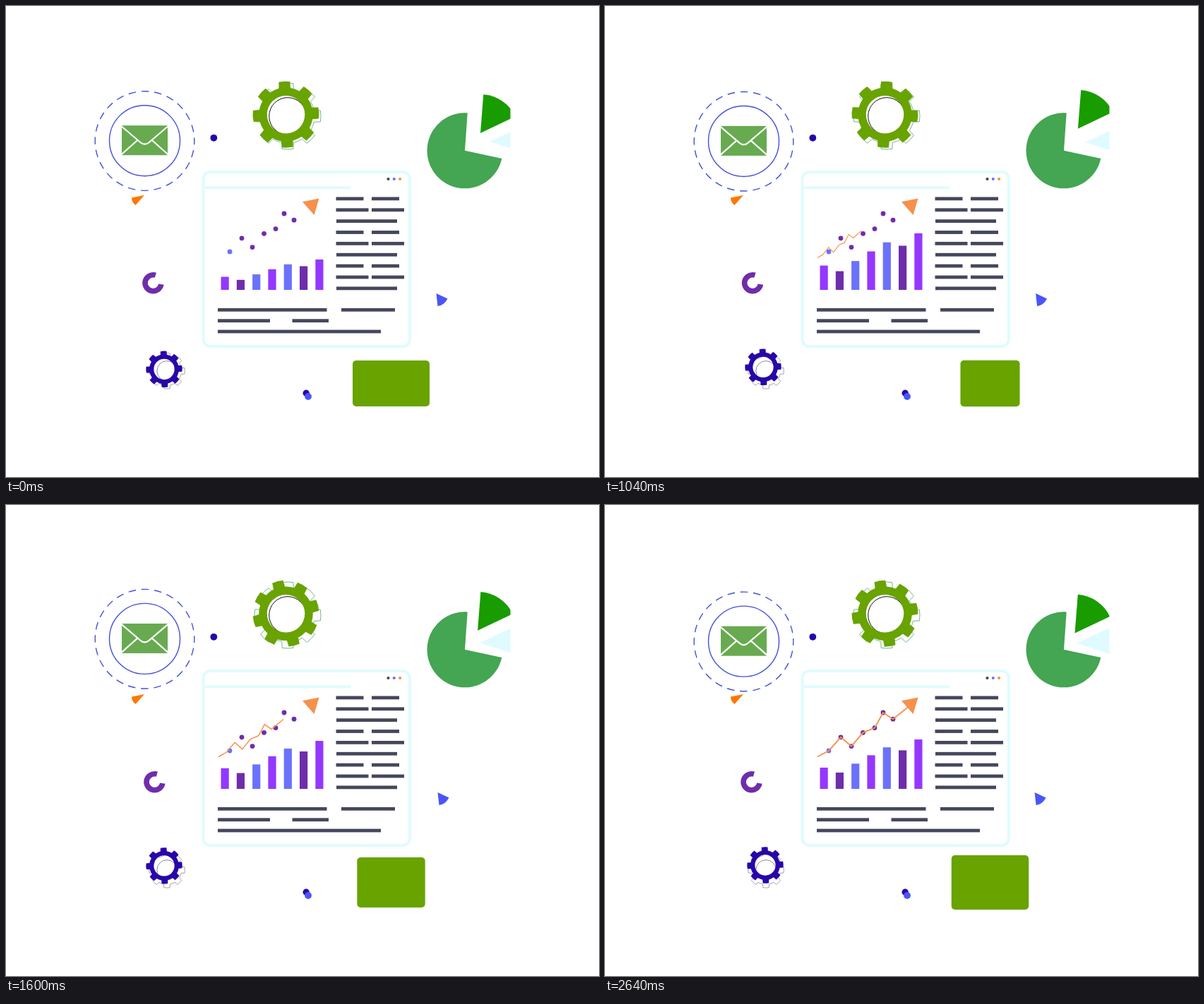
Recreate the animation shown at these times as an HTML page with a canvas. Size 840 by 667 pixels, loop 2720 ms.

```html
<!DOCTYPE html>
<html lang="en">
<head>
<meta charset="utf-8">
<title>Dashboard</title>
<style>
html, body { margin: 0; height: 100%; overflow: hidden; background: #fff; }
canvas { display: block; }
</style>
</head>
<body>
<canvas id="stage" width="840" height="667"></canvas>
<script>
const ctx = document.getElementById('stage').getContext('2d');
const LOOP = 2720, STEP = 80, TAU = Math.PI * 2, DEG = Math.PI / 180;
const INK = '#45475c', ICE = '#e0fbff', NAVY = '#2806a8', BLUE = '#4a55f8',
  SOFT = '#6b72fa', PURPLE = '#6f2dab', VIOLET = '#9438ff', ORANGE = '#f5914a',
  GREEN = '#68a300', LINE = '#4250d8';

// Straight move from a to b between two times, held outside them
const move = (t, t0, t1, a, b) => a + (b - a) * Math.max(0, Math.min(1, (t - t0) / (t1 - t0)));
// Move from a to b until the turning time, then on to c
const turn = (t, mid, end, a, b, c) => t < mid ? move(t, 0, mid, a, b) : move(t, mid, end, b, c);

function fill(color, rule) { ctx.fillStyle = color; ctx.fill(rule || 'nonzero'); }
function stroke(color, width) { ctx.strokeStyle = color; ctx.lineWidth = width; ctx.stroke(); }
function box(x, y, w, h, color) { ctx.fillStyle = color; ctx.fillRect(x, y, w, h); }
function dot(x, y, r, color) { ctx.beginPath(); ctx.arc(x, y, r, 0, TAU); fill(color); }
function circle(x, y, r, color, width) { ctx.beginPath(); ctx.arc(x, y, r, 0, TAU); stroke(color, width); }
function poly(...pts) { ctx.beginPath(); pts.forEach(p => ctx.lineTo(...p)); }
function slice(x, y, r, from, to, color) {
  ctx.beginPath();
  ctx.moveTo(x, y);
  ctx.arc(x, y, r, from * DEG, to * DEG);
  fill(color);
}

function gearPath(x, y, r, angle) {
  ctx.beginPath();
  for (let i = 0; i < 8; i++) {
    const tooth = angle - 90 + i * 45;
    ctx.arc(x, y, r * 0.815, (tooth - 32.5) * DEG, (tooth - 12.5) * DEG);
    ctx.arc(x, y, r, (tooth - 9.7) * DEG, (tooth + 9.7) * DEG);
  }
  ctx.closePath();
}

function gear(x, y, r, angle, color) {
  gearPath(x, y, r, angle);
  ctx.moveTo(x + r * 0.57, y);
  ctx.arc(x, y, r * 0.57, 0, TAU);
  fill(color, 'evenodd');
}

function gearOutline(x, y, r, rim, hole) {
  gearPath(x, y, r, 0);
  stroke(rim, 0.8);
  circle(x, y, r * 0.56, hole, 1);
}

function gears(t) {
  gearOutline(399, 156, 47, '#4fa46c', '#111');
  gear(396.5, 153.7, 47, -2.7 + t * 0.0488, GREEN);
  gearOutline(228, 516.8, 25.3, '#8d8a9c', '#8d8a9c');
  gear(move(t, 1600, 2640, 224, 227), turn(t, 400, 2640, 514.3, 511.8, 510), 25.7, -2, NAVY);
}

function mail(t) {
  ctx.save();
  ctx.translate(196.5, 191.7 + 2.6 * Math.cos((t - 560) / 1800 * TAU));
  circle(0, 0, 50, LINE, 1.4);
  const unit = TAU * 70.3 / 24;
  ctx.setLineDash([unit * 0.58, unit * 0.42]);
  ctx.lineDashOffset = unit * 0.29;
  circle(0, 0.3, 70.3, LINE, 1.4);
  ctx.setLineDash([]);
  box(-32.5, -21.5, 65, 42, '#67aa50');
  ctx.beginPath();
  ctx.moveTo(-33, -20.5);
  ctx.lineTo(-6, 2.5);
  ctx.quadraticCurveTo(0, 7.5, 6, 2.5);
  ctx.lineTo(33, -20.5);
  for (const s of [-1, 1]) { ctx.moveTo(33 * s, 19.5); ctx.lineTo(10.5 * s, -0.5); }
  stroke('#fff', 2.2);
  ctx.restore();
}

function pie(t) {
  slice(650, 204.8, 53.5, 12, 274, '#44a552');
  ctx.save();
  ctx.beginPath();
  ctx.rect(0, 0, 714.5, 667);
  ctx.clip();
  slice(move(t, 400, 2400, 672, 665.5), turn(t, 800, 2100, 180, 172, 181.5), 55, -85.5, -25.5, '#189c00');
  const pull = move(t, 760, 1760, 0, 17);
  slice(685 - pull, 192 + pull * 0.22, 56, -25, 18, ICE);
  ctx.restore();
}

const points = [[317, 348], [334, 328.8], [349, 341.6], [365.5, 322.3], [382, 315.6], [394, 294], [408, 303.2]];
const bars = [[0.43, VIOLET], [0.33, PURPLE], [0.51, SOFT], [0.68, VIOLET], [0.84, SOFT], [0.78, PURPLE], [1, VIOLET]];

function text() {
  const line = (x, y, w) => box(x, y - 2.4, w, 4.8, INK);
  for (let i = 0; i < 9; i++) {
    const y = 272.9 + i * 15.87;
    if (i % 3 === 2) {
      line(468, y, 86);
    } else {
      const w = 39 + i % 3 * 7;
      line(467.5, y, w);
      line(518, y, w);
    }
  }
  line(300, 430.3, 154.5);
  line(475, 430.3, 76);
  line(300, 445.7, 74);
  line(405.5, 445.7, 51.5);
  line(300, 461, 231);
}

function trend(t) {
  if (!t) return;
  const x0 = 301, y0 = 356.5;
  const sx = Math.min(1, t * (0.000488 - 3.1e-8 * t)), sy = 0.1 + 0.9 * sx;
  poly([x0, y0], ...[...points, [432, 284]].map(([x, y]) => [x0 + (x - x0) * sx, y0 + (y - y0) * sy]));
  stroke(ORANGE, 0.4 + 1.5 * sx);
}

function browser(t) {
  ctx.beginPath();
  ctx.roundRect(279.5, 235, 292.5, 247, 10);
  stroke(ICE, 4);
  box(281, 255.3, 207, 4, ICE);
  [INK, SOFT, ORANGE].forEach((c, i) => dot(541.5 + i * 8.3, 245, 2.1, c));
  text();

  const height = t < 2140 ? turn(t, 1120, 2140, 43, 83, 51) : move(t, 2140, 2640, 51, 70);
  bars.forEach(([ratio, color], i) => box(304.5 + i * 22.3, 402, 11.2, -height * ratio, color));

  points.forEach(([x, y], i) => dot(x, y, 3.4, i ? PURPLE : SOFT));
  trend(t);
  poly([420, 277.3], [443.5, 272.5], [436.5, 296]);
  fill(ORANGE);
}

// Triangle with one rounded side between b and c
function wedge(a, b, bend, c, color) {
  ctx.beginPath();
  ctx.moveTo(...a);
  ctx.lineTo(...b);
  ctx.quadraticCurveTo(...bend, ...c);
  fill(color);
}

function smallShapes(t) {
  dot(294.3, 186.8, 4.9, NAVY);
  dot(425.2, 548.3, 4.7, NAVY);
  dot(428, 553, 4.9, BLUE);
  wedge([196, 268], [178, 271.5], [178, 278], [183.5, 282], '#ff7800');

  const sway = t < 1700 ? move(t, 800, 1600, 0, 2) : move(t, 1700, 2640, 2, -0.9);
  ctx.save();
  ctx.translate(sway, 0);
  wedge([609.5, 407], [625.5, 414.5], [620.5, 424], [611.5, 425], BLUE);
  ctx.beginPath();
  ctx.arc(208.5, 392.2, 11.5, 10 * DEG, 287 * DEG);
  stroke(PURPLE, 7.6);
  ctx.restore();
}

function card(t) {
  const w = turn(t, 990, 2200, 109, 83, 109.5), h = move(t, 1000, 2200, 65, 77);
  ctx.beginPath();
  ctx.roundRect(545.5 - w / 2, 534.5 - h / 2, w, h, 5);
  fill(GREEN);
}

function draw(now) {
  const t = Math.floor(now % LOOP / STEP) * STEP;
  box(0, 0, 840, 667, '#fff');
  for (const part of [mail, gears, pie, browser, smallShapes, card]) part(t);
}

function loop() {
  draw(performance.now());
  requestAnimationFrame(loop);
}
loop();
</script>
</body>
</html>
```
